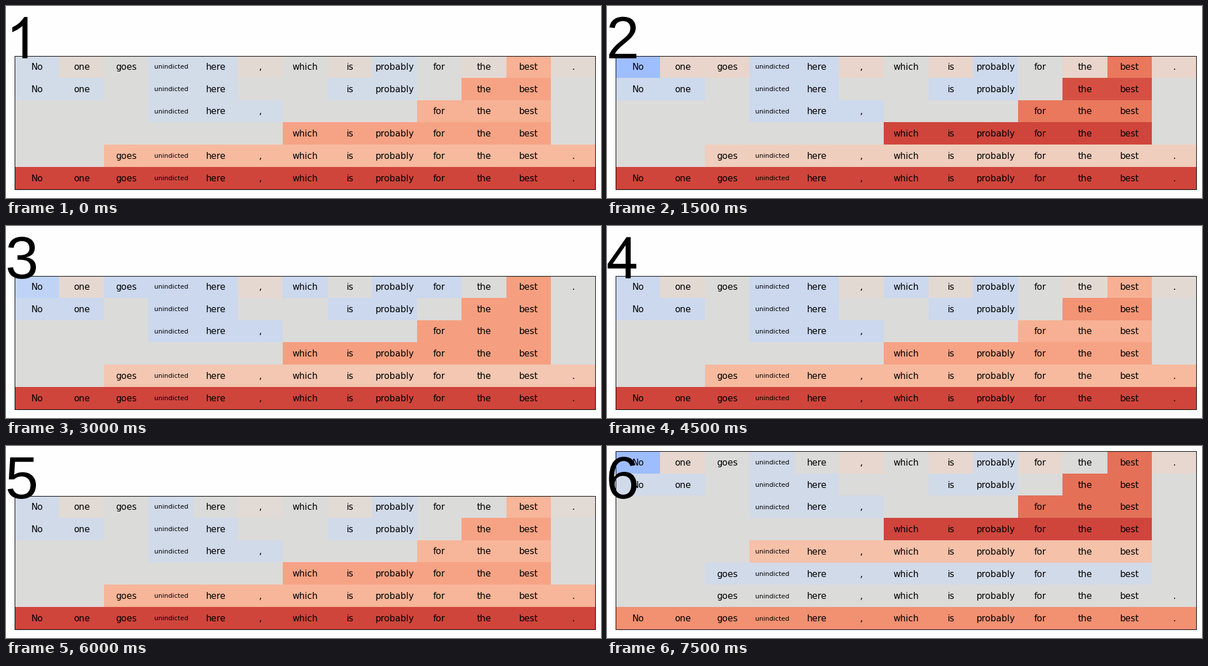
These frames come from a looping animation (1032x334 px, 8000 ms). A matplotlib script:

```python
import matplotlib.pyplot as plt
from matplotlib.animation import FuncAnimation
from matplotlib.patches import PathPatch, Rectangle
from matplotlib.path import Path
from matplotlib.textpath import TextPath
from matplotlib.transforms import Affine2D

W, H, DPI = 1032, 334, 100
LEFT, COL_W = 14.9, 77.515
ROW_H = 38.745
LINE_SHIFT = 0.95          # text and border sit this far below the cell edges
GREY, PAGE = "#dbdbda", "#fefefe"
SENTENCE = "No one goes unindicted here , which is probably for the best ."
WORDS = SENTENCE.split()


def part(start, stop=None):
    return " ".join(WORDS[start:stop])


# Rows below the single words: phrases, each with the level that colours it.
OPENING = [
    [("No one", "cool"), ("unindicted here", "cool"),
     ("is probably", "cool"), ("the best", "pair")],
    [("unindicted here ,", "cool"), ("for the best", "best")],
    [("which is probably for the best", "which")],
]
SHORT = OPENING + [[(part(2), "clause")], [(SENTENCE, "full")]]
LONG = OPENING + [[(part(3, -1), "clause")], [(part(2, -1), "cool")],
                  [(part(2), "neutral")], [(SENTENCE, "full")]]


def make_step(cool_words, warm_words, cool, warm, best, pair, which, clause,
              full=0.922, layout=SHORT):
    """Rows of (phrase, score); 0 is cold, 0.5 neutral, 1 hot."""
    levels = dict(cool=cool, warm=warm, best=best, pair=pair, which=which,
                  clause=clause, full=full, neutral=0.5)
    tone = dict.fromkeys(WORDS, 0.5)
    tone.update(dict.fromkeys(cool_words.split(), cool))
    tone.update(dict.fromkeys(warm_words.split(), warm))
    tone["best"] = best
    # The stronger the praise, the colder the opening negation.
    tone["No"] = cool - 1.15 * max(0, best - 0.7)
    phrases = [[(text, levels[name]) for text, name in row] for row in layout]
    return [list(tone.items())] + phrases


STEPS = [
    make_step("unindicted here probably", "one , is the .",
              0.46, 0.525, 0.685, 0.723, 0.723, 0.66),
    make_step("unindicted here probably", "one goes , is the .",
              0.445, 0.548, 0.828, 0.903, 0.922, 0.585),
    make_step("goes unindicted here which probably for", "one ,",
              0.435, 0.535, 0.735, 0.735, 0.735, 0.615),
    make_step("unindicted here which probably", "one , is the .",
              0.437, 0.527, 0.69, 0.765, 0.723, 0.66),
    make_step("unindicted probably", "one , is .",
              0.455, 0.522, 0.672, 0.723, 0.723, 0.672),
    make_step("unindicted probably", "one , is for .",
              0.455, 0.54, 0.84, 0.84, 0.922, 0.635, 0.773, LONG),
]

# Plain outlines for the straight-edged digits, baseline at y = 0.
ONE = Path([(28.5, 0), (37.3, 0), (37.3, 71.9), (31.6, 71.9), (28.3, 67.2),
            (23.8, 62.3), (17.7, 57.6), (10.9, 53.9), (10.9, 45.4),
            (20.1, 50), (28.5, 56), (28.5, 0)], closed=True)
FOUR = Path.make_compound_path(
    Path([(32.3, 0), (32.3, 17.1), (1.3, 17.1), (1.3, 25.2), (33.9, 71.6),
          (41.1, 71.6), (41.1, 25.2), (50.8, 25.2), (50.8, 17.1),
          (41.1, 17.1), (41.1, 0), (32.3, 0)], closed=True),
    Path([(32.3, 25.2), (32.3, 57.5), (9.9, 25.2), (32.3, 25.2)], closed=True))

fig = plt.figure(figsize=(W / DPI, H / DPI), dpi=DPI, facecolor=PAGE)
ax = fig.add_axes([0, 0, 1, 1])
cmap = plt.get_cmap("coolwarm")


def box(x0, y0, x1, y1, color):
    ax.add_patch(Rectangle((x0, y0), x1 - x0, y1 - y0, fc=color, lw=0,
                           antialiased=False))


def col_x(k):
    return round(LEFT + COL_W * k)


def draw_digit(number):
    outlines = {1: ONE, 4: FOUR}
    if number in outlines:
        path, x = outlines[number], 0
    else:
        path = TextPath((0, 0), str(number), size=103.5,
                        prop={"family": "Liberation Sans"})
        ext = path.get_extents()
        x = 27.4 - (ext.x0 + ext.x1) / 2
    place = Affine2D().scale(1, -1).translate(x, 91)
    ax.add_patch(PathPatch(place.transform_path(path), fc="black", lw=0,
                           zorder=5))


def draw_phrase(text, score, top, y_min):
    words = text.split()
    first = WORDS.index(words[0])
    box(col_x(first), max(round(top), y_min),
        col_x(first + len(words)), round(top + ROW_H),
        GREY if score == 0.5 else cmap(score))
    for k, word in enumerate(words, first):
        ax.text(LEFT + COL_W * (k + 0.5), top + ROW_H / 2 + LINE_SHIFT, word,
                size=8 if len(word) > 8 else 11, family="DejaVu Sans",
                ha="center", va="center")


def draw(frame):
    ax.clear()
    ax.set(xlim=(0, W), ylim=(H, 0))
    ax.axis("off")
    step = frame // 3
    rows = STEPS[step]
    top = 9 + 38.53 * (8 - len(rows))
    x0, x1 = col_x(0), col_x(len(WORDS))
    y0 = int(top + LINE_SHIFT)
    y1 = int(top + ROW_H * len(rows) + LINE_SHIFT) + 1
    box(x0, y0, x1, y1, GREY)
    for r, row in enumerate(rows):
        for text, score in row:
            draw_phrase(text, score, top + ROW_H * r, y0)
    for edge in ((x0, y0, x1, y0 + 1), (x0, y1 - 1, x1, y1),
                 (x0, y0, x0 + 1, y1), (x1 - 1, y0, x1, y1)):
        box(*edge, "black")
    draw_digit(step + 1)


anim = FuncAnimation(fig, draw, frames=16, interval=500, repeat=True)
plt.show()
```
